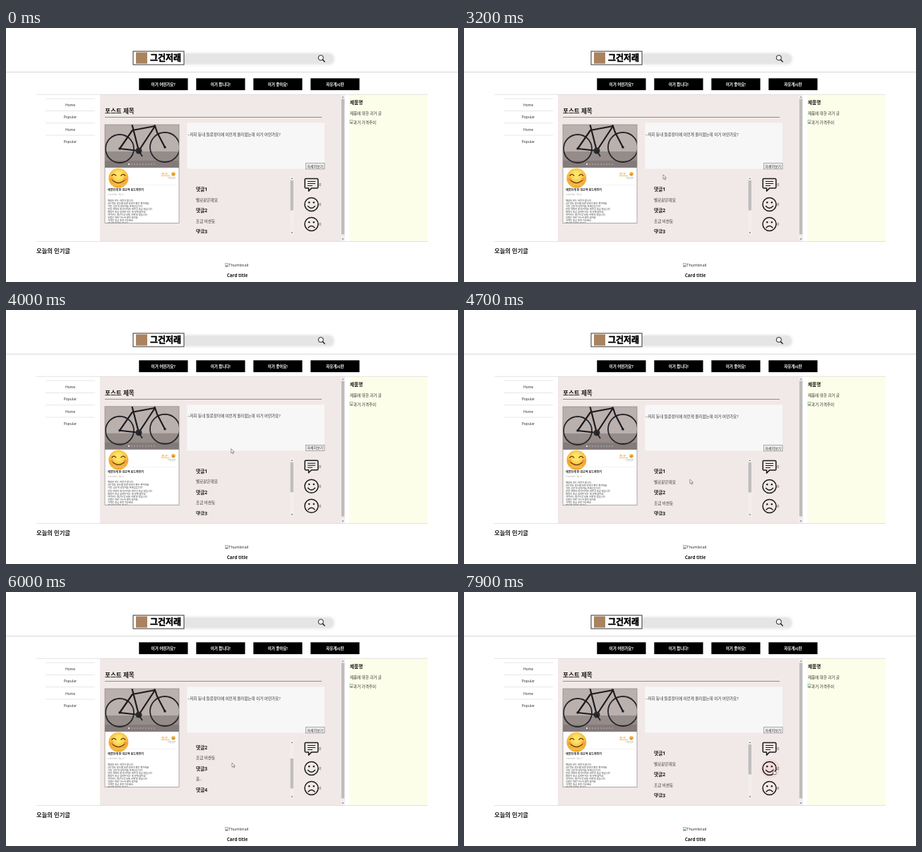
Write an HTML page that moves like this. It is 640 px wide and 360 px high and loops after 8000 ms.

```html
<!DOCTYPE html>
<html lang="ko">
<head>
<meta charset="utf-8">
<style>
html, body { margin: 0; width: 100%; height: 100%; overflow: hidden; background: #fff; }
svg { display: block; width: 100%; height: 100%; }
text { font-family: "Noto Sans", "Noto Sans CJK KR", "Noto Sans CJK", sans-serif; fill: #333; }
.b { font-weight: 700; fill: #1a1a1a; }
.w { font-weight: 700; fill: #fff; }
.logo { font-weight: 900; fill: #000; stroke: #000; stroke-width: .5; }
.g { fill: #999; }
.o { fill: #e9a63a; font-weight: 700; }
.line { fill: none; stroke: #1a1a1a; stroke-width: 1.5; stroke-linecap: round; stroke-linejoin: round; }
</style>
</head>
<body>
<svg id="stage" viewBox="0 0 640 360" xmlns="http://www.w3.org/2000/svg"></svg>
<script>
const LOOP = 8000, STEP = 100;
const stage = document.getElementById('stage');

// y is the optical middle of the line
const text = (x, y, size, str, cls = '', anchor = 'start', id = '') =>
  `<text x="${x}" y="${y + size * 0.37}" font-size="${size}" class="${cls}" text-anchor="${anchor}"${id && ` id="${id}"`}>${str}</text>`;
const rect = (x, y, w, h, fill, extra = '') =>
  `<rect x="${x}" y="${y}" width="${w}" height="${h}" fill="${fill}" ${extra}/>`;
const circle = (x, y, r, fill, extra = '') =>
  `<circle cx="${x}" cy="${y}" r="${r}" fill="${fill}" ${extra}/>`;
const path = (d, extra = 'class="line"') => `<path d="${d}" ${extra}/>`;
const clip = (id, x, y, w, h) => `<clipPath id="${id}">${rect(x, y, w, h, '#000')}</clipPath>`;
const each = (list, fn) => list.map(fn).join('');

const broken = (x, y) =>
  rect(x, y - 2.5, 4, 5, '#e8f0e8', 'stroke="#8a9a92" stroke-width=".6"') +
  path(`M${x} ${y + 2}l2-2 2 2z`, 'fill="#5a9a55"');

const arrow = (x, y, dir) =>
  path(`M${x - 1.4} ${y + dir * 0.8}h2.8l-1.4 ${-dir * 1.7}z`, 'fill="#666"');

function header() {
  const labels = ['이거 어떤가요?', '이거 팝니다!', '이거 좋아요!', '자유게시판'];
  return rect(250, 36.2, 214, 15, '#dcdcdc', 'rx="6" filter="url(#soft)"') +
    rect(250, 36.5, 212.5, 13.5, '#e5e5e5', 'rx="6"') +
    rect(180, 33, 72, 19, '#fff', 'stroke="#333" stroke-width="1"') +
    rect(184, 34.5, 16, 16, '#a9835f') +
    text(204, 42.5, 12, '그건저래', 'logo') +
    circle(445.8, 42.2, 3.6, '#f4f4f4', 'stroke="#222" stroke-width="1"') +
    path('M448.5 45l2.6 2.8', 'stroke="#222" stroke-width="1.5" stroke-linecap="round"') +
    rect(0, 62, 640, 0.8, '#cfcfcf') +
    each(labels, (s, i) => rect(188.3 + i * 81, 71.3, 69.2, 16.8, '#000') +
      text(222.8 + i * 81, 80, 5.5, s, 'w', 'middle'));
}

function sides() {
  return rect(486, 94, 111, 208.5, '#fdfeea') +
    each(['Home', 'Popular', 'Home', 'Popular'], (s, i) =>
      rect(56, 99.8 + i * 17.3, 70, 0.7, '#dcdcdc') +
      text(91, 109.3 + i * 17.3, 5, s, '', 'middle')) +
    text(487, 105.5, 6.6, '제품명', 'b') +
    text(487, 120.7, 5.5, '제품에 대한 과거 글') +
    broken(487, 133) + text(491.8, 133.5, 5.6, '과거 가격추이') +
    text(43, 316, 8.3, '오늘의 인기글', 'b') +
    broken(310.5, 336) + text(315.3, 336, 5.6, 'Thumbnail') +
    text(327.5, 351, 6.4, 'Card title', 'b', 'middle');
}

function bike() {
  const wheel = (x, y, r) =>
    circle(x, y, r, 'none', 'stroke="#26252a" stroke-width="1.8"') + circle(x, y, 1.8, '#222');
  return `<g clip-path="url(#photo)">` +
    rect(140, 137, 105, 61, '#bab0ae') + rect(140, 175, 105, 23, '#958c8a') +
    rect(140, 188, 105, 10, '#837b7a') +
    wheel(161, 171, 20) + wheel(225, 169, 21) +
    path('M161 171L188 174L178 135M161 171L179 145L211 139L188 174M209 133L214 148L225 169',
      'fill="none" stroke="#1c1b1f" stroke-width="2.2" stroke-linejoin="round"') +
    circle(188, 174, 4.5, '#2a292d') + path('M188 174l5 8', 'stroke="#1c1b1f" stroke-width="1.6"') +
    '</g>' +
    each([0, 1, 2, 3, 4, 5, 6, 7, 8, 9], i =>
      circle(174 + i * 4, 193, i ? 0.7 : 1.1, i ? '#c9c5c2' : '#fff'));
}

function post() {
  const lines = ['깨끗한 로드 자전거 팝니다', '2년 정도 탔으며 보관 상태가 좋은 편이에요',
    '기종: 검은색 알루미늄 프레임입니다', '안장 커버와 새 타이어로 바꾸고 조금 탔습니다',
    '흠집이 조금 있지만 타는 데 문제 없어요', '사이즈는 중간이고 보통 키에 잘 맞습니다',
    '부품은 따로 나누어 팔지 않아요', '가격은 조금 조정 가능해요', '편하게 물어봐 주세요'];
  return rect(140, 137, 105, 139.5, '#fff') + bike() +
    '<g clip-path="url(#card)">' +
    circle(159.3, 212.8, 14, 'url(#sun)') +
    path('M149.8 209.3q3-4 6 0M162.8 209.3q3-4 6 0', 'fill="none" stroke="#6b3d0d" stroke-width="1.3" stroke-linecap="round"') +
    path('M150.3 215.3q9 8.5 18 0', 'fill="none" stroke="#6b3d0d" stroke-width="1.2" stroke-linecap="round"') +
    circle(149.8, 214.3, 2.3, '#f18a4b', 'opacity=".65"') + circle(168.8, 214.3, 2.3, '#f18a4b', 'opacity=".65"') +
    text(220, 206.5, 4, '36.5°', 'o') + rect(219.5, 209.2, 12.5, 0.8, '#edb048') +
    circle(237, 207, 2.8, '#f2ad35') +
    path('M235.4 207.6q1.6 1.6 3.2 0', 'fill="none" stroke="#754617" stroke-width=".5"') +
    text(240.5, 213.2, 3.2, '이용점수', 'g', 'end') +
    rect(144, 222.5, 97, 0.4, '#e2e2e2') +
    text(144, 229.5, 4, '깨끗하게 탄 검은색 로드자전거', 'b') +
    text(144, 236.3, 2.7, '스포츠/레저 · 3일 전', 'g') +
    each(lines, (s, i) => text(144, 244.3 + i * 4.1, 3.3, s)) +
    '</g>' + rect(140, 137, 105, 139.5, 'none', 'stroke="#8a8583" stroke-width=".7"');
}

function comments() {
  const replies = ['별로같은데요', '조금 비싼듯', '흠..', '좋아보여요'];
  return '<g clip-path="url(#list)"><g id="thread">' +
    each(replies, (s, i) => text(269, 228.5 + i * 30, 6.7, '댓글' + (i + 1), 'b') +
      text(269, 243.5 + i * 30, 5.6, s)) +
    '</g></g>' +
    rect(402, 210, 5.5, 83, '#f3eeed') + arrow(404.8, 213.3, 1) + arrow(404.8, 290.3, -1) +
    rect(402.6, 216, 4.3, 42.5, '#bebcbc', 'id="threadThumb"');
}

function reactions() {
  const face = (y, mouth) => circle(432.5, y, 9.5, 'none', 'class="line"') +
    circle(429.2, y - 2.8, 1.2, '#1a1a1a') + circle(435.8, y - 2.8, 1.2, '#1a1a1a') + path(mouth);
  return circle(433.5, 250.5, 13.5, '#f3dad9', 'id="halo"') +
    path('M424.5 213.5h16q1.3 0 1.3 1.3v11q0 1.3-1.3 1.3h-8l-4 4v-4h-4q-1.3 0-1.3-1.3v-11q0-1.3 1.3-1.3z') +
    path('M427 217.5h11M427 220.5h11M427 223.5h7', 'stroke="#1a1a1a" stroke-width="1.2"') +
    face(250, 'M427.5 252.5q5 5.5 10 0') + face(278, 'M428 283q4.5-5 9 0') +
    text(443.2, 222.5, 5, '0') + text(443.2, 250.5, 5, '0', '', 'start', 'likes') +
    text(443.2, 278.5, 5, '0');
}

function board() {
  return rect(133, 94, 347, 208.5, '#f1e9e7') +
    '<g clip-path="url(#board)"><g id="content">' +
    text(140, 117.6, 8.6, '포스트 제목', 'b') + rect(140, 126.2, 307, 0.8, '#777') + post() +
    rect(256.5, 134.5, 194.5, 65, '#f7f7f8') +
    text(257, 150.7, 5.55, '~저희 동네 들콩장터에 이런게 올라왔는데 이거 어떤가요?') +
    rect(424.3, 191.7, 26.7, 8.2, '#efefef', 'stroke="#777" stroke-width=".6"') +
    text(437.7, 195.9, 4.9, '자세히보기', '', 'middle') +
    comments() + reactions() + '</g></g>' +
    rect(474, 94.5, 6, 207.5, '#f1eeee') + arrow(477, 97.8, 1) + arrow(477, 299.3, -1) +
    rect(474.8, 100.5, 4.3, 192, '#bebcbc', 'id="boardThumb"') +
    rect(43, 93.8, 554, 0.7, '#d9d6d4') + rect(43, 302.2, 554, 0.7, '#d9d6d4');
}

stage.innerHTML = '<defs>' +
  clip('photo', 140, 137, 105, 61) + clip('card', 140, 198, 105, 78.5) +
  clip('list', 256, 209, 146, 82) + clip('board', 133, 94.5, 341, 207.7) +
  '<filter id="soft" x="-10%" y="-80%" width="120%" height="260%"><feGaussianBlur stdDeviation="2"/></filter>' +
  '<radialGradient id="sun" cy=".35"><stop offset=".3" stop-color="#ffe566"/><stop offset="1" stop-color="#f3ae2f"/></radialGradient></defs>' +
  rect(0, 0, 640, 360, '#fff') + header() + sides() + board() +
  path('M0 0v6.2l1.5-1.4 1.1 2.4 1-.5-1.1-2.3h2z', 'id="pointer" fill="#fff" stroke="#555" stroke-width=".6"') +
  path('M0 0q.8-.6 1.2.3l.4 2.4 2.6.6q.7.3.5 1.2l-.6 2.5h-3l-2-2.8q.2-.8 1.2 0z',
    'id="hand" fill="#fff" stroke="#333" stroke-width=".6"');

const el = Object.fromEntries([...stage.querySelectorAll('[id]')].map(n => [n.id, n]));

// eased value at time t through [time, value] keys
function track(t, keys) {
  let [t0, v0] = keys[0];
  for (const [t1, v1] of keys) {
    if (t < t1) {
      const p = Math.max(0, (t - t0) / (t1 - t0));
      return v0 + (v1 - v0) * p * p * (3 - 2 * p);
    }
    [t0, v0] = [t1, v1];
  }
  return v0;
}

const move = (node, x, y) => node.setAttribute('transform', `translate(${x} ${y})`);
const show = (node, on) => node.setAttribute('visibility', on ? 'visible' : 'hidden');

const boardKeys = [[3300, 0], [3550, 3.5], [3750, 3.5], [4050, 0]];
const threadKeys = [[5000, 0], [5300, 15.3], [5750, 38.3], [6000, 38.3], [6500, 0]];
const xKeys = [[3200, 282], [3500, 319.7], [3800, 319.7], [4000, 318.7], [4800, 320], [6300, 320], [6900, 460], [7200, 437.5]];
const yKeys = [[3200, 208], [3500, 196.3], [4000, 196.7], [4800, 242], [6300, 242], [6900, 228], [7200, 251.5]];

function draw(t) {
  const down = track(t, boardKeys), list = track(t, threadKeys);
  const x = track(t, xKeys), y = track(t, yKeys);
  const hover = t >= 7100;
  move(el.content, 0, -down);
  move(el.boardThumb, 0, down * 0.92);
  move(el.thread, 0, -list);
  move(el.threadThumb, 0, list * 0.52);
  move(el.pointer, x, y);
  move(el.hand, x, y);
  show(el.pointer, t >= 3200 && !hover);
  show(el.hand, hover);
  show(el.halo, hover);
  el.likes.textContent = t >= 7800 ? 2 : t >= 7400 ? 1 : 0;
}

const start = performance.now();
function tick() {
  const t = (performance.now() - start) % LOOP;
  draw(Math.floor(t / STEP) * STEP);
  requestAnimationFrame(tick);
}
tick();
</script>
</body>
</html>
```
